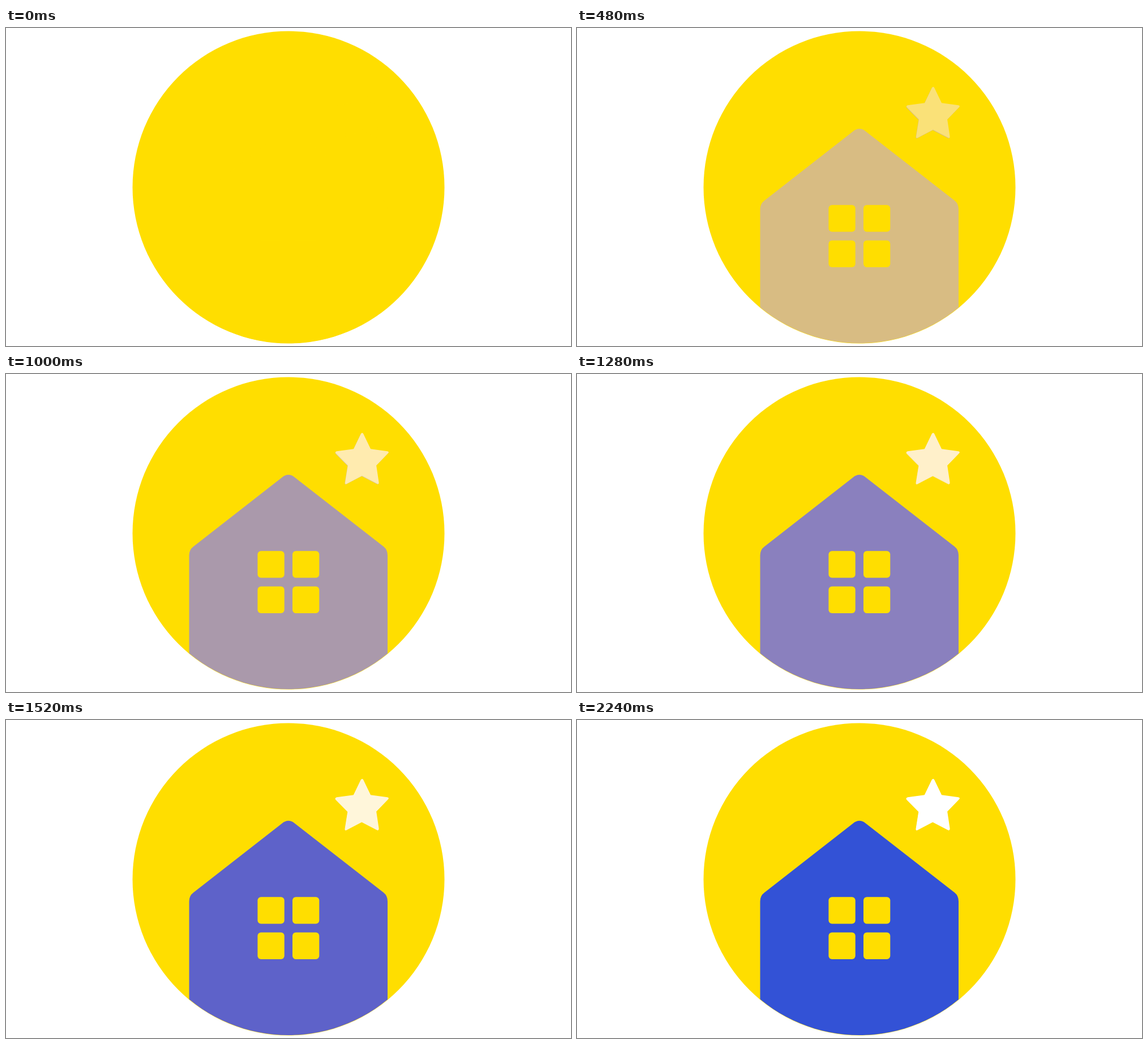
An HTML page that plays this animation: 998x561 px, repeating every 2280 ms.

```html
<!DOCTYPE html>
<html lang="en">
<head>
<meta charset="utf-8">
<title>House and star</title>
<style>
  @property --house { syntax: "<color>"; inherits: true; initial-value: #ffde00; }
  @property --star { syntax: "<color>"; inherits: true; initial-value: #ffde00; }
  @property --rim { syntax: "<color>"; inherits: true; initial-value: #ffde00; }

  html, body { margin: 0; width: 100%; height: 100%; overflow: hidden; background: #fff; }
  svg { display: block; width: 100%; height: 100%; animation: dusk 2280ms infinite; }
  .sky { fill: #ffde00; }
  .house { fill: var(--house); }
  .star { fill: var(--star); }
  .rim { fill: var(--rim); }

  /* The fade is curved like a blend in linear light, one step each 40 ms. */
  @keyframes dusk {
    0%     { --house: #ffde00; --star: #ffde00; --rim: #ffde00; animation-timing-function: steps(1); }
    8.77%  { --house: #fada34; --star: #fedf30; --rim: #fada34; animation-timing-function: steps(3); }
    14.03% { --house: #eacd63; --star: #fce059; --rim: #eacd63; animation-timing-function: steps(4); }
    21.05% { --house: #d8bc83; --star: #fae178; --rim: #d8bc83; animation-timing-function: steps(8); }
    35.08% { --house: #c0ab9e; --star: #ffe79b; --rim: #c8b590; animation-timing-function: steps(12); }
    56.13% { --house: #8a80be; --star: #fff0ca; --rim: #f8e6b8; animation-timing-function: steps(6); }
    66.66% { --house: #5e62c9; --star: #fff6da; --rim: #fff6da; animation-timing-function: steps(3); }
    71.92% { --house: #3352d6; --star: #fff7e3; --rim: #fff7e3; animation-timing-function: steps(15); }
    98.24%, 100% { --house: #3352d6; --star: #ffffff; --rim: #ffffff; }
  }
</style>
</head>
<body>
<svg viewBox="0 0 998 561">
  <defs>
    <clipPath id="disc"><circle cx="499" cy="281" r="275"/></clipPath>
    <path id="star" d="M613.5 133 L626.5 106 Q628.5 103 630.5 106 L643.5 133
      L673 137 Q677 138 674.3 140.5 L653.5 162 L658 192 Q658.3 196 654.8 194
      L628.3 180.3 L601.5 194.2 Q598 196 598.5 192 L603.3 162
      L582.3 140.7 Q580 138 583.7 137 Z"/>
    <rect id="pane" width="47.3" height="47.3" rx="6"/>
  </defs>
  <circle class="sky" cx="499" cy="281" r="275.5"/>
  <path class="house" clip-path="url(#disc)" d="M323.5 600 V320 Q323.5 310 331 304.5
    L487.5 182.5 Q498.5 173.5 509.5 182 L667 304.5 Q674 310 674 320 V600 Z"/>
  <g class="sky">
    <use href="#pane" x="444.4" y="312.2"/>
    <use href="#pane" x="506" y="312.2"/>
    <use href="#pane" x="444.4" y="374.8"/>
    <use href="#pane" x="506" y="374.8"/>
  </g>
  <use class="rim" href="#star"/>
  <use class="star" href="#star" x="0.6" y="-0.7"/>
</svg>
</body>
</html>
```
